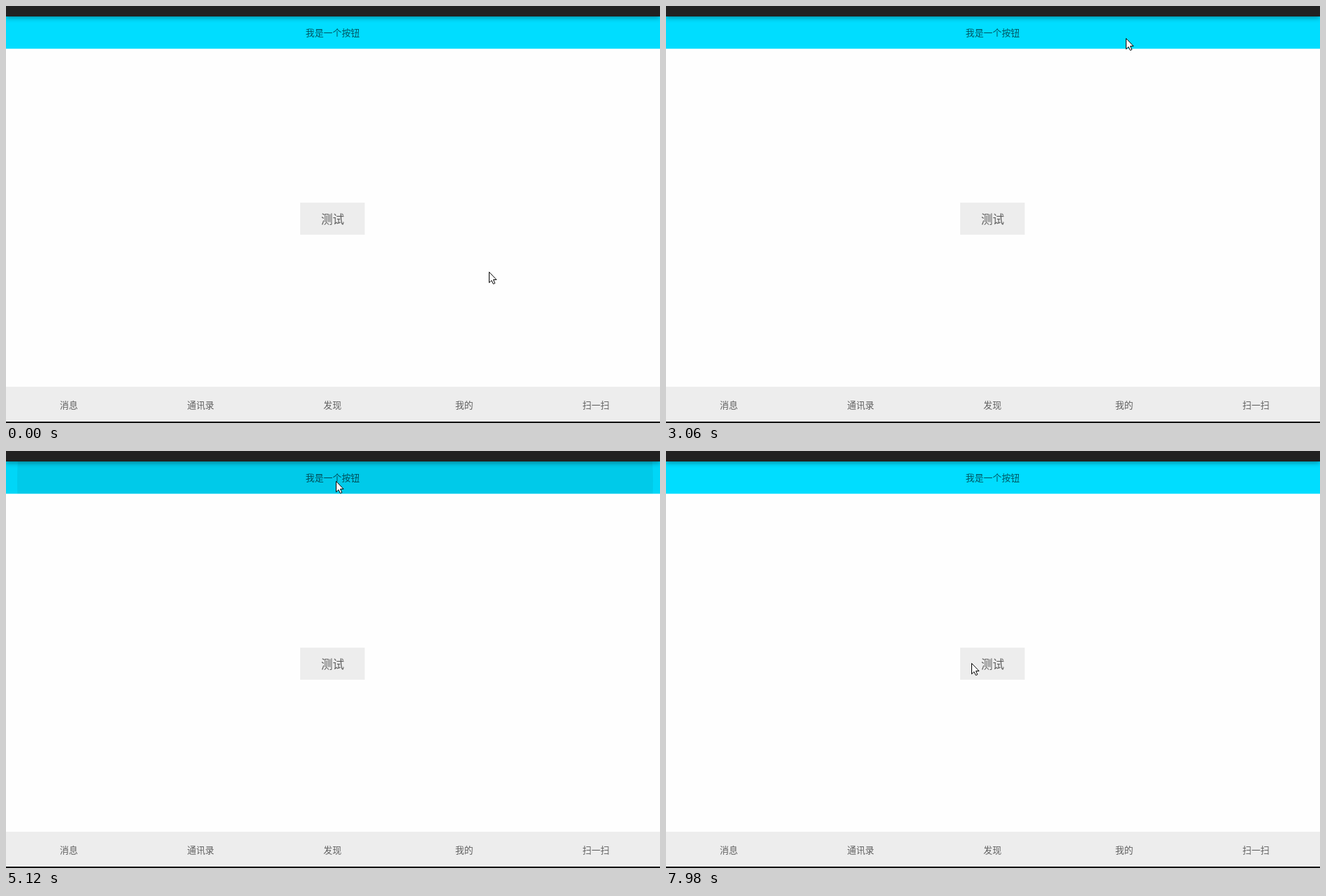
An HTML page that plays this animation: 936x598 px, repeating every 8000 ms.

```html
<!DOCTYPE html>
<html lang="zh-CN">
<head>
<meta charset="utf-8">
<style>
html, body { margin: 0; width: 100%; height: 100%; overflow: hidden; background: #fefefe; }
svg { display: block; }
text { font: 12.9px "Noto Sans CJK SC", "Noto Sans CJK", sans-serif; text-anchor: middle; fill: #5f5f5f; }
#status { position: absolute; top: 0; left: 0; width: 936px; height: 15px; background: #212121; box-shadow: 0 2px 7px rgba(0, 0, 0, .37); }
#pointer { position: absolute; top: 0; left: 0; }
</style>
</head>
<body>
<svg width="936" height="598">
  <clipPath id="headerClip"><rect y="15" width="936" height="46.3"/></clipPath>
  <clipPath id="buttonClip"><rect x="421" y="282" width="92.5" height="46"/></clipPath>
  <rect y="15" width="936" height="46.3" fill="#00ddff"/>
  <rect x="421" y="282" width="92.5" height="46" fill="#ededed"/>
  <rect y="546" width="936" height="50" fill="#ededed"/>
  <rect y="596" width="936" height="2"/>
  <g id="press">
    <rect width="936" height="598" opacity=".03"/>
    <circle id="ripple" opacity=".055"/>
  </g>
  <text x="467.5" y="43.4" style="fill:#000;opacity:.62">我是一个按钮</text>
  <text x="467.5" y="312.3" style="font-size:16.6px">测试</text>
  <g id="tabs"></g>
</svg>
<div id="status"></div>
<svg id="pointer" width="13" height="20">
  <path d="M.5 .5V15.8L4 12.6L6.4 17.6L8.8 16.6L6.5 11.5H11Z" fill="#fff" stroke="#000"/>
</svg>
<script>
const $ = id => document.getElementById(id);
const LOOP = 8000, STEP = 140;

$('tabs').innerHTML = ['消息', '通讯录', '发现', '我的', '扫一扫']
  .map((label, i) => `<text x="${90 + i * 188.6}" y="576.7">${label}</text>`).join('');

// Pointer moves, each eased over a number of steps
const home = { x: 691, y: 381 };
const moves = [
  { at: 130, steps: 4, x: 434, y: 130 },
  { at: 700, steps: 4, x: 680, y: 42 },
  { at: 1240, steps: 4, x: 836, y: 48 },
  { at: 2920, steps: 4, x: 479, y: 43 },
  { at: 4420, steps: 2, x: 472, y: 43 },
  { at: 5380, steps: 5, x: 507, y: 303 },
  { at: 6100, steps: 4, x: 480, y: 300 },
  { at: 7830, steps: 2, x: 437, y: 304 }
];

const header = { clip: 'headerClip', radius: 141, grow: 157 };
const button = { clip: 'buttonClip', radius: 11, grow: 11 };
const presses = [
  { from: 2070, to: 2780, on: header },
  { from: 3580, to: 4150, on: header },
  { from: 4820, to: 5240, on: header },
  { from: 6810, to: 7240, on: button }
];

const stepsSince = (start, t) => Math.floor((t - start) / STEP);
const ease = p => p * p * (3 - 2 * p);

function pointerAt(t) {
  let { x, y } = home;
  for (const m of moves.filter(m => m.at <= t)) {
    const p = ease(Math.min(1, (stepsSince(m.at, t) + 1) / m.steps));
    x += (m.x - x) * p;
    y += (m.y - y) * p;
  }
  return { x: Math.round(x), y: Math.round(y) };
}

function draw(t) {
  const { x, y } = pointerAt(t);
  $('pointer').style.transform = `translate(${x}px, ${y}px)`;

  const press = presses.find(p => t >= p.from && t < p.to);
  $('press').style.display = press ? '' : 'none';
  if (press) {
    const { clip, radius, grow } = press.on;
    $('press').setAttribute('clip-path', `url(#${clip})`);
    $('ripple').setAttribute('cx', x - 1);
    $('ripple').setAttribute('cy', y);
    $('ripple').setAttribute('r', radius + grow * stepsSince(press.from, t));
  }
}

const begin = performance.now();
(function tick() {
  draw((performance.now() - begin) % LOOP);
  requestAnimationFrame(tick);
})();
</script>
</body>
</html>
```
